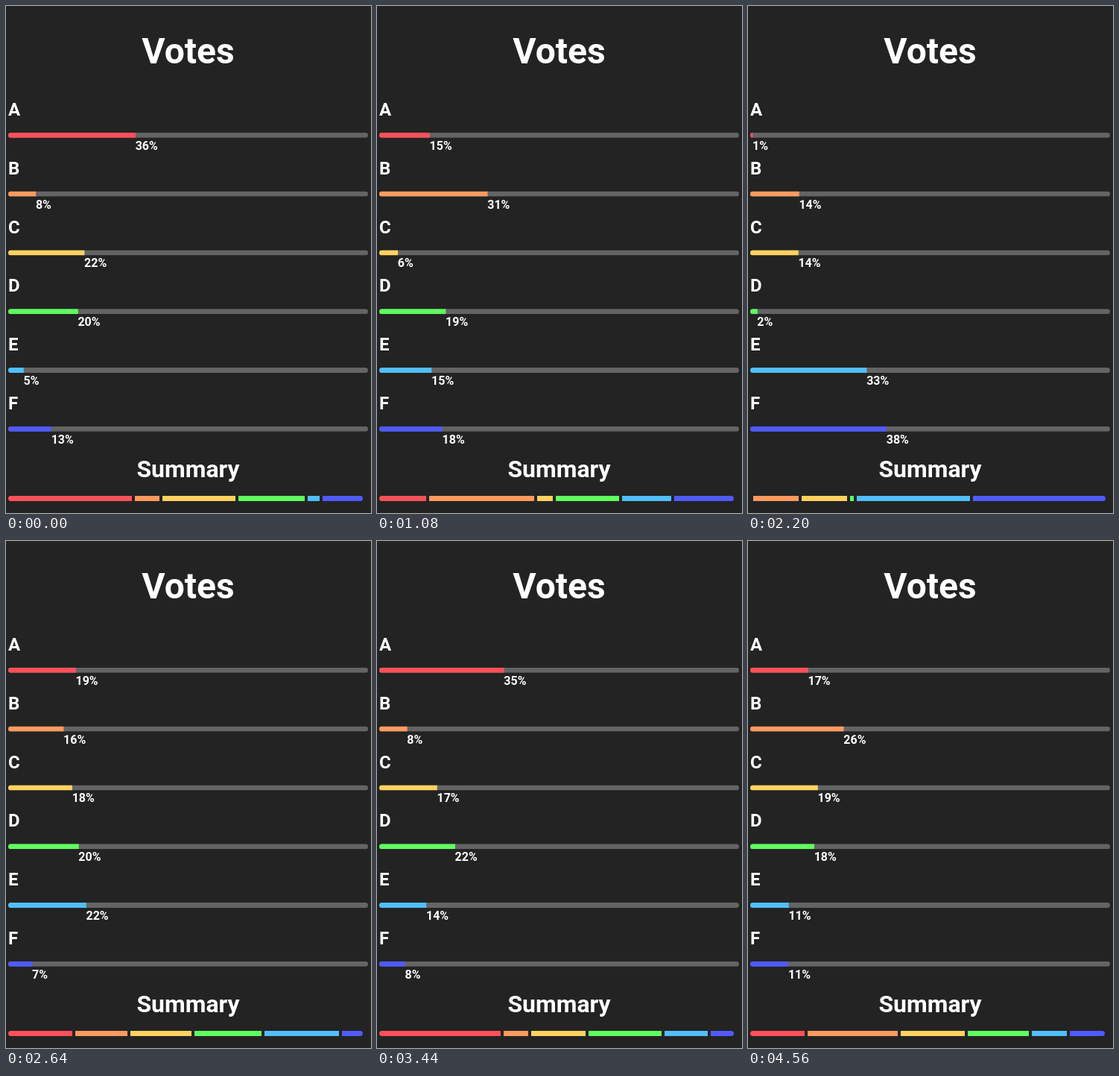
An HTML page that plays this animation: 490 by 680 pixels, repeating every 4600 ms.

```html
<!DOCTYPE html>
<html lang="en">
<head>
<meta charset="utf-8">
<title>Votes</title>
<style>
  html, body { margin: 0; width: 100%; height: 100%; overflow: hidden; background: #232323; }
  svg { display: block; width: 490px; height: 680px; }
  text { font-family: Roboto, sans-serif; font-weight: 700; fill: #fff; }
</style>
</head>
<body>
<svg id="stage" viewBox="0 0 490 680">
  <rect width="490" height="680" fill="#232323"/>
  <text x="244.5" y="77" font-size="48" text-anchor="middle">Votes</text>
  <text x="244.5" y="632" font-size="32" text-anchor="middle">Summary</text>
</svg>
<script>
const LOOP = 4600, STEP = 40;
const LEFT = 3, TRACK = 483, THICK = 7, PITCH = 78.8;
const SUM_WIDTH = 480, SUM_Y = 657, GAP = 4;
const MIN_SHARE = 0.6;
const COLORS = ['#ff505a', '#ff9a5f', '#ffd25f', '#5fff5f', '#50beff', '#505aff'];

// the vote at a few moments: time, then percent for A to E; F gets the rest
const POLLS = [
  [0, 35.4, 7.7, 21.2, 19.4, 4.3],
  [640, 22.9, 34.5, 3.7, 26, 5.2],
  [1520, 6.3, 20.9, 9.7, 9.1, 24.8],
  [2200, 0.7, 13.6, 13.4, 2, 32.4],
  [2640, 18.8, 15.4, 17.8, 19.6, 21.7],
  [3440, 34.7, 7.8, 16.1, 21.1, 13.1],
  [4560, 16.1, 26, 18.8, 17.8, 10.7]
].map(([time, ...p]) => ({ time, p: [...p, 100 - p.reduce((a, b) => a + b)] }));

const stage = document.getElementById('stage');

function add(parent, tag, attrs) {
  const el = document.createElementNS('http://www.w3.org/2000/svg', tag);
  for (const k in attrs) el.setAttribute(k, attrs[k]);
  parent.appendChild(el);
  return el;
}

function roundClip(id, y, width) {
  const clip = add(stage, 'clipPath', { id });
  return add(clip, 'rect', { x: LEFT, y, width, height: THICK, rx: 3.5 });
}

const rows = COLORS.map((fill, i) => {
  const top = i * PITCH, y = 169.8 + top, id = 'track' + i;
  add(stage, 'text', { x: LEFT, y: 147 + top, 'font-size': 24 }).textContent = 'ABCDEF'[i];
  roundClip(id, y, TRACK);
  const g = add(stage, 'g', { 'clip-path': `url(#${id})` });
  add(g, 'rect', { x: LEFT, y, width: TRACK, height: THICK, fill: '#646464' });
  return {
    bar: add(g, 'rect', { x: LEFT, y, height: THICK, fill }),
    label: add(stage, 'text', { y: 192.8 + top, 'font-size': 16 })
  };
});

const sumClip = roundClip('sum', SUM_Y, SUM_WIDTH - GAP);
const sumGroup = add(stage, 'g', { 'clip-path': 'url(#sum)' });
const parts = COLORS.map(fill => add(sumGroup, 'rect', { y: SUM_Y, height: THICK, fill }));

// slope at a poll, taken from its neighbours
function slope(k, i) {
  const a = POLLS[Math.max(k - 1, 0)], b = POLLS[Math.min(k + 1, POLLS.length - 1)];
  return (b.p[i] - a.p[i]) / (b.time - a.time);
}

// smooth curve through all polls
function share(t, i) {
  let k = 0;
  while (k < POLLS.length - 2 && t >= POLLS[k + 1].time) k++;
  const a = POLLS[k], b = POLLS[k + 1], d = b.time - a.time;
  const u = (t - a.time) / d, v = 1 - u;
  const p = v * v * (1 + 2 * u) * a.p[i] + u * u * (1 + 2 * v) * b.p[i]
    + d * u * v * (v * slope(k, i) - u * slope(k + 1, i));
  return Math.max(MIN_SHARE, p) / 100;
}

function draw(t) {
  let x = LEFT;
  rows.forEach(({ bar, label }, i) => {
    const p = share(t, i), w = Math.max(GAP, p * SUM_WIDTH);
    bar.setAttribute('width', p * TRACK);
    label.setAttribute('x', LEFT - 0.3 + p * TRACK);
    label.textContent = Math.ceil(p * 100) + '%';
    const from = Math.round(x), to = Math.round(x + w);
    parts[i].setAttribute('x', from);
    parts[i].setAttribute('width', Math.max(0, to - from - GAP));
    x += w;
  });
  sumClip.setAttribute('width', Math.round(x) - GAP - LEFT);
}

const start = performance.now();
function tick() {
  const t = (performance.now() - start) % LOOP;
  draw(Math.floor(t / STEP) * STEP);
  requestAnimationFrame(tick);
}
tick();
</script>
</body>
</html>
```
